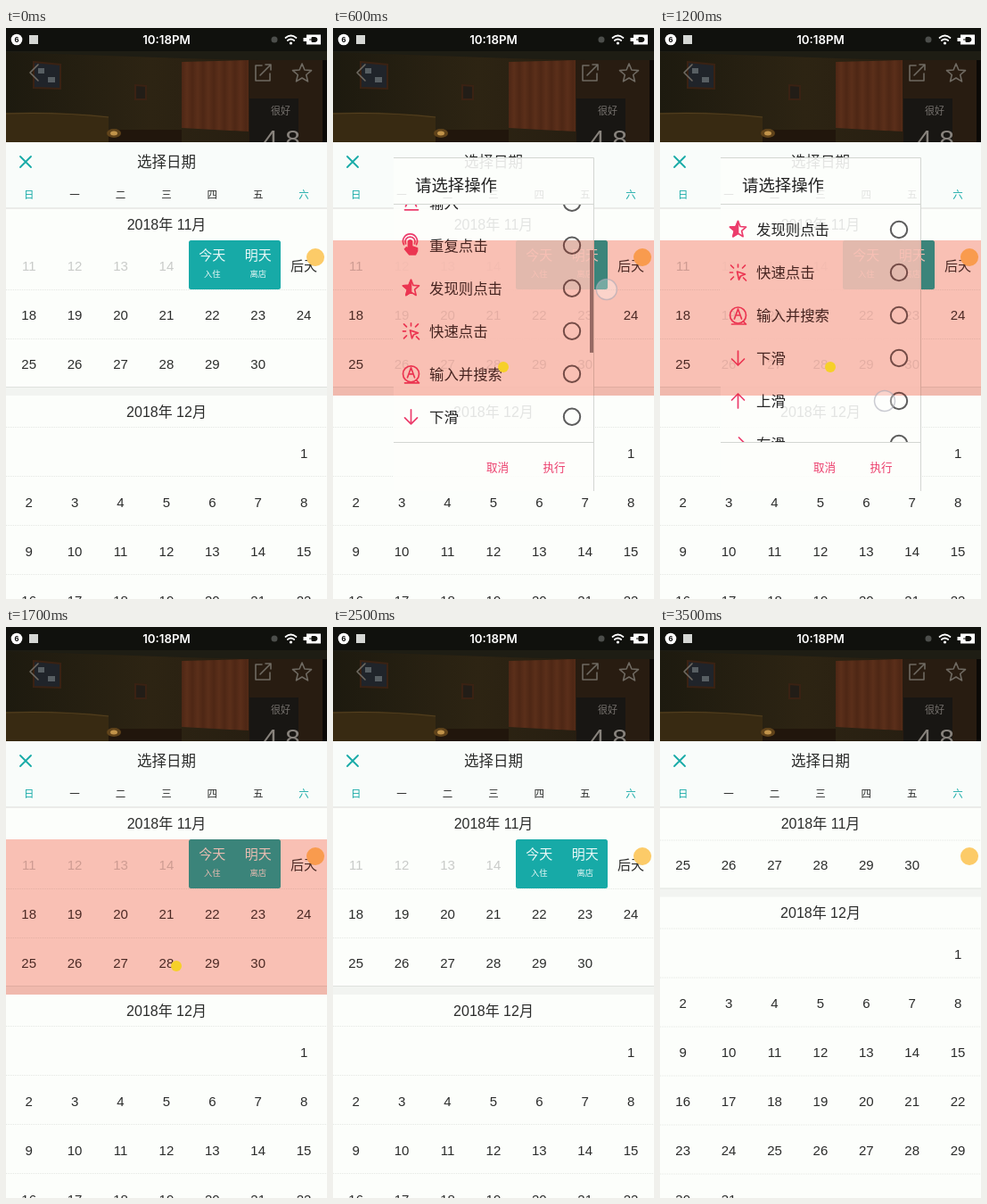
Recreate the animation shown at these times as an HTML page. Size 360 px wide and 640 px high, loop 3700 ms.

```html
<!DOCTYPE html>
<html lang="zh">
<head>
<meta charset="utf-8">
<title>选择日期</title>
<style>
  html, body { margin: 0; width: 100%; height: 100%; overflow: hidden; background: #fcfefb; }
  svg { display: block; width: 100%; height: 100%; }
  text { font-family: "Liberation Sans", "Noto Sans CJK SC", "Noto Sans CJK", sans-serif; text-anchor: middle; }
  .left { text-anchor: start; }
  .clock { font-family: Inter, sans-serif; font-weight: 600; }
  .line { fill: none; stroke-linecap: round; stroke-linejoin: round; }
  .multiply { mix-blend-mode: multiply; }
</style>
</head>
<body>
<svg id="stage" viewBox="0 0 360 640">
  <defs>
    <clipPath id="listClip"><rect x="68" y="198" width="224" height="266"/></clipPath>
    <linearGradient id="wall">
      <stop offset="0" stop-color="#1d1a0f"/><stop offset=".45" stop-color="#2d2413"/><stop offset="1" stop-color="#221a10"/>
    </linearGradient>
    <linearGradient id="curtain" x2=".16" spreadMethod="repeat">
      <stop offset="0" stop-color="#4e2715"/><stop offset=".5" stop-color="#5b2f1a"/><stop offset="1" stop-color="#4e2715"/>
    </linearGradient>
  </defs>

  <!-- room behind the sheet -->
  <rect width="360" height="130" fill="url(#wall)"/>
  <path d="M0 26H360V38L200 34L0 27Z" fill="#1e1d14"/>
  <path d="M0 95Q60 93 115 99V128H0Z" fill="#382a12"/>
  <path d="M0 96Q60 94 115 100" fill="none" stroke="#54401f" stroke-width="1.2"/>
  <path d="M115 114H197V128H115Z" fill="#21160c"/>
  <path d="M197 38L272 36V116L197 112Z" fill="url(#curtain)"/>
  <path d="M272 36H360V128H272Z" fill="#281c11"/>
  <path d="M355 36H360V128H355Z" fill="#0b0906"/>
  <g stroke="#3a2213" stroke-width="2">
    <path d="M31 38L61 41V68L31 67Z" fill="#20242a"/>
    <path d="M145 64L157 65V80L145 80Z" fill="#221d17"/>
  </g>
  <path d="M36 45H43V51H36ZM47 55H55V61H47Z" fill="#585f63"/>
  <ellipse cx="121" cy="118" rx="8" ry="5" fill="#60431a"/>
  <ellipse cx="121" cy="118" rx="4" ry="2.5" fill="#c1934a"/>
  <rect x="273" y="79" width="55" height="50" fill="#181613"/>
  <g class="line" stroke="#6f6a62" stroke-width="1.6">
    <path d="M36 41L27 50L36 59"/>
    <path d="M287 42H280V59H296V51M285 53L297 41M291 41H297V47"/>
    <path id="favorite"/>
  </g>

  <!-- status bar -->
  <rect width="360" height="26" fill="#10110d"/>
  <circle cx="12" cy="13" r="6.3" fill="#fff"/>
  <rect x="26" y="8" width="10" height="10" fill="#d5d7d4"/>
  <circle cx="301" cy="13" r="3.5" fill="#4c4e4b"/>
  <g class="line" stroke="#fff" stroke-width="1.7">
    <path d="M313.500 11Q319.500 6 325.500 11M315.800 14Q319.500 11 323.200 14"/>
  </g>
  <circle cx="319.500" cy="17" r="1.6" fill="#fff"/>
  <path d="M337 7.500H353V18.500H337ZM333.500 11H337V15H333.500Z" fill="#fff"/>
  <path d="M340 13H343M343 10.500H346Q349 10.500 349 13T346 15.500H343Z" stroke="#10110d" fill="#10110d"/>
  <g id="labels"></g>

  <!-- date sheet -->
  <rect y="128" width="360" height="512" fill="#fcfefb"/>
  <g id="days"></g>
  <g id="head"></g>
  <circle cx="347" cy="257" r="10" fill="#fccb68"/>

  <!-- action dialog -->
  <g id="dialog">
    <rect x="68" y="145" width="224" height="374" fill="#fdfefc" fill-opacity=".88"/>
    <path d="M68 145.500H292.500V519" fill="none" stroke="#d3d6d2"/>
    <path d="M68 197.500H292M68 464.500H292" stroke="#d3d6d2"/>
    <g clip-path="url(#listClip)">
      <g id="list"></g>
      <rect id="bar" x="288" width="4" height="115" fill="#858585"/>
    </g>
    <g id="buttons"></g>
  </g>

  <g id="pick">
    <rect y="238" width="360" height="174" fill="#f5422e" fill-opacity=".16"/>
    <rect y="238" width="360" height="174" fill="#fcdcd3" class="multiply"/>
    <circle id="dot" r="6" fill="#f6d029"/>
  </g>
  <circle id="touch" r="11.500" fill="#fff" fill-opacity=".3" stroke="#a9a9b5" stroke-opacity=".6" stroke-width="1.500"/>
</svg>
<script>
const $ = id => document.getElementById(id);
const TEAL = '#17aaa7', INK = '#2b2c2b', ROSE = '#ec3d6c';
const LOOP = 3700, TICK = 100;

const label = (x, y, size, str, fill = INK, more = '') =>
  `<text x="${x}" y="${y + size * .37}" font-size="${size}" fill="${fill}" ${more}>${str}</text>`;
const colX = i => 25.7 + 51.4 * i;

const star = (r, cx = 0, cy = 0) => 'M' + Array.from({length: 10}, (_, i) => {
  const a = i * Math.PI / 5, q = i % 2 ? r * .45 : r;
  return `${(cx + q * Math.sin(a)).toFixed(1)} ${(cy - q * Math.cos(a)).toFixed(1)}`;
}).join('L') + 'Z';
$('favorite').setAttribute('d', star(11, 332, 51));

$('labels').innerHTML =
  label(12, 13, 9, '6', '#111', 'font-weight="700"') +
  label(180, 13.5, 13.3, '10:18PM', '#fff', 'class="clock"') +
  label(308, 93, 11, '很好', '#77736f') +
  label(309, 124, 30, '4.8', '#88837d');

const stay =
  `<rect x="205" y="238" width="103" height="55" rx="2.5" fill="${TEAL}"/>` +
  [['今天', '入住'], ['明天', '离店']].map(([day, note], i) =>
    label(colX(4 + i), 254, 15, day, '#e9f8f7') + label(colX(4 + i), 276, 9.3, note, '#e9f8f7')).join('');

function buildDays() {
  let out = '';
  for (const y of [293, 348, 447, 502, 557, 612, 667, 722])
    out += `<path d="M0 ${y + .5}H360" stroke="#e4e7e3" stroke-dasharray="1 1"/>`;
  out += '<path d="M0 403H360V412H0Z" fill="#f2f4f1"/><path d="M0 402.5H360" stroke="#dfe2de"/>';
  for (let d = 11; d <= 30; d++) {
    const i = d - 11;
    if (d == 15 || d == 16) continue;
    out += label(colX(i % 7), 266 + 55 * Math.floor(i / 7), 15, d == 17 ? '后天' : d, d < 15 ? '#c9cbc9' : INK);
  }
  out += label(180, 430, 16, '2018年 12月');
  for (let d = 1; d <= 31; d++)
    out += label(colX((d + 5) % 7), 476 + 55 * Math.floor((d + 5) / 7), 15, d);
  return out + stay;
}
$('days').innerHTML = buildDays();

$('head').innerHTML =
  '<rect y="128" width="360" height="110" fill="#fcfefb"/>' +
  '<rect y="128" width="360" height="74" fill="#f9fcfa"/>' +
  '<path d="M0 202H360" stroke="#dcdad7"/>' +
  `<path d="M16 144L28 156M28 144L16 156" class="line" stroke="${TEAL}" stroke-width="1.8"/>` +
  label(180, 150, 16.5, '选择日期') +
  [...'日一二三四五六'].map((c, i) => label(colX(i), 187, 11.5, c, i % 6 ? INK : TEAL)).join('') +
  label(180, 220, 16, '2018年 11月');

// Icons are drawn around their own centre.
const hand = '<path d="M-3-4a2 2 0 0 1 4 0V1L7 3V6L5 10H-2L-7 4L-5 2L-3 4Z" fill="currentColor"/>';
const letterA = '<path d="M-4 4L0-7L4 4M-2.500 0H2.500"/>';
const icons = {
  tap: hand + '<path d="M-6-2a5.500 5.500 0 1 1 10 0"/>',
  press: '<path d="M-5 0H-8V-9H8V0H4" fill="currentColor"/><path d="M-4 0V-6H2V0" stroke="#fff"/>' + hand,
  type: '<path d="M-6 4L0-8L6 4M-4 0H4M-7 8H8"/>',
  repeat: hand + '<path d="M-6-2a5.500 5.500 0 1 1 10 0M-8-1a8 8 0 1 1 14 0"/>',
  find: `<path d="${star(9.5)}"/><path d="M0-9.500L-2.500-3.500L-9-3L-4 1.300L-5.600 7.700L0 4.300Z" fill="currentColor"/>`,
  burst: '<path d="M-1-1L8 2L3 4L1 8ZM-5-5L-8-8M0-6V-9M5-5L8-8M-6 0H-9M-5 5L-8 8M6 6L9 9"/>',
  search: '<circle r="9"/>' + letterA + '<path d="M-7 10H8M6 7L9 10"/>',
  down: '<path d="M0-8V8M-7 1L0 8L7 1"/>',
  up: '<path d="M0 8V-8M-7-1L0-8L7-1"/>',
  right: '<path d="M-8 0H8M1-7L8 0L1 7"/>'
};
const actions = [
  ['tap', '点击'], ['press', '长按'], ['type', '输入'], ['repeat', '重复点击'], ['find', '发现则点击'],
  ['burst', '快速点击'], ['search', '输入并搜索'], ['down', '下滑'], ['up', '上滑'], ['right', '右滑']
];
const rowY = i => 221 + 48 * i;

$('list').innerHTML = actions.map(([icon, name], i) =>
  `<g class="line" transform="translate(87.5 ${rowY(i)})" stroke="${ROSE}" color="${ROSE}" stroke-width="1.7">${icons[icon]}</g>` +
  label(108, rowY(i), 16.4, name, '#252525', 'class="left"') +
  `<circle cx="268" cy="${rowY(i)}" r="9.2" fill="none" stroke="#5c5c5c" stroke-width="2"/>`).join('') +
  `<g id="mark" fill="${ROSE}"><circle cx="268" r="9.2" fill="#fff" stroke="${ROSE}" stroke-width="2"/><circle cx="268" r="5.5"/></g>`;
$('buttons').innerHTML =
  label(92, 176, 18.4, '请选择操作', '#222', 'class="left"') +
  label(184.5, 492, 12.6, '取消', ROSE) + label(248, 492, 12.6, '执行', ROSE);

const clamp = (v, lo = 0, hi = 1) => Math.min(hi, Math.max(lo, v));
const mix = (a, b, p) => a + (b - a) * p;
const ease = (t, from, to) => { const p = clamp((t - from) / (to - from)); return p * p * (3 - 2 * p); };
const move = (id, x, y) => $(id).setAttribute('transform', `translate(${x} ${y})`);
const fade = (id, o) => $(id).setAttribute('opacity', o);
const between = (t, a, b) => t >= a && t < b;

function touchAt(t, swipe) {
  if (between(t, 400, 900)) return [mix(290, 316, swipe), mix(420, 224, swipe)];
  if (between(t, 1200, 1300)) return [252, 418];
  if (between(t, 1400, 1500)) return [248, 492];
}

function draw(t) {
  move('days', 0, -109.5 * ease(t, 2900, 3300));

  const swipe = ease(t, 300, 800), offset = 187 * swipe;
  fade('dialog', clamp((t - 100) / 200) * clamp((1600 - t) / 200));
  move('list', 0, -offset);
  move('mark', 0, rowY(t < 1300 ? 0 : 8));
  move('bar', 0, 198 + offset * .42);
  fade('bar', t < 400 ? 0 : clamp((1100 - t) / 200));

  const drag = clamp(t / 200);
  fade('pick', between(t, 100, 2500) ? 1 : 0);
  move('dot', mix(347, 191, drag), mix(257, 380, drag));

  const touch = touchAt(t, swipe);
  fade('touch', touch ? 1 : 0);
  if (touch) move('touch', ...touch);
}

const start = performance.now();
function frame() {
  const t = (performance.now() - start) % LOOP;
  draw(Math.floor(t / TICK) * TICK);
  requestAnimationFrame(frame);
}
frame();
</script>
</body>
</html>
```
